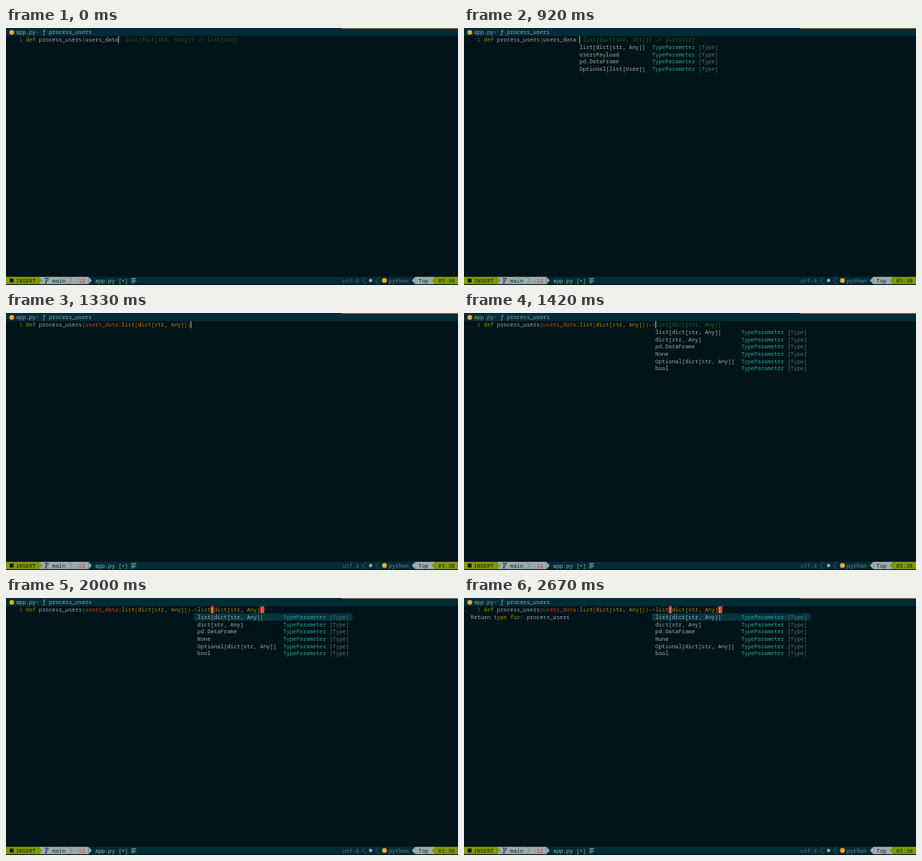
An HTML page with a canvas that plays this animation: 600x342 px, repeating every 2750 ms.

```html
<!DOCTYPE html>
<html lang="en">
<head>
<meta charset="utf-8">
<title>Editor completion</title>
<style>
html, body { margin: 0; width: 100%; height: 100%; overflow: hidden; background: #001419; }
canvas { display: block; width: 600px; height: 342px; }
</style>
</head>
<body>
<canvas id="stage"></canvas>
<script>
const W = 600, H = 342, LOOP = 2750;
const CELL = 4.38, ROW = 9.71, TOP = 1;
const STATUS_ROW = 34;
const C = {
  bg: '#001419', bar: '#002c38', select: '#063540', dim: '#576d74', text: '#9eabac',
  green: '#849900', yellow: '#b28500', orange: '#c94c16', red: '#db302d',
  cyan: '#29a298', ghost: '#2a651c', name: '#8fc3a0', python: '#eaa82c'
};

const canvas = document.getElementById('stage');
const ctx = canvas.getContext('2d');
const ratio = window.devicePixelRatio || 1;
canvas.width = W * ratio;
canvas.height = H * ratio;

const colX = col => col * CELL;
const rowY = row => TOP + row * ROW;

function fillCells(col, row, count, color) {
  ctx.fillStyle = color;
  ctx.fillRect(colX(col), rowY(row), count * CELL, ROW);
}

// Every glyph sits on the terminal grid; returns the column after the text.
function put(col, row, text, color) {
  ctx.fillStyle = color;
  for (const ch of text) {
    if (ch !== ' ') ctx.fillText(ch, colX(col), rowY(row) + 7.4);
    col++;
  }
  return col;
}

function putAll(col, row, parts) {
  for (const [text, color] of parts) col = put(col, row, text, color);
  return col;
}

function path(points, close) {
  ctx.beginPath();
  points.forEach(([x, y]) => ctx.lineTo(x, y));
  if (close) ctx.closePath();
}

function dot(col, row, radius, color) {
  ctx.fillStyle = color;
  ctx.beginPath();
  ctx.arc(colX(col), rowY(row) + ROW / 2, radius, 0, Math.PI * 2);
  ctx.fill();
}

// dir is 1 for a tip on the right, -1 for a tip on the left.
function arrow(col, row, dir, color, filled) {
  const y = rowY(row);
  const base = colX(dir > 0 ? col : col + 1);
  path([[base, y], [base + dir * CELL, y + ROW / 2], [base, y + ROW]], filled);
  if (filled) {
    ctx.fillStyle = color;
    ctx.fill();
  } else {
    ctx.strokeStyle = color;
    ctx.lineWidth = 0.7;
    ctx.stroke();
  }
}

function drawHeader() {
  ctx.fillStyle = C.bar;
  ctx.fillRect(0, 0, W, TOP + ROW);
  ctx.fillStyle = '#b5752a';
  ctx.fillRect(446, 0, W - 446, 1);
  dot(1.75, 0, 3.2, C.python);
  put(3, 0, 'app.py', C.text);
  put(9, 0, '›', C.green);
  put(11, 0, 'ƒ', C.text);
  put(13, 0, 'process_users', C.text);
}

function drawBranch(x, y) {
  ctx.strokeStyle = C.bar;
  ctx.lineWidth = 0.8;
  path([[x, y + 1.5], [x, y + 8.5]]);
  ctx.stroke();
  path([[x, y + 6], [x + 2.6, y + 4.6], [x + 2.6, y + 2]]);
  ctx.stroke();
  ctx.fillStyle = C.bar;
  for (const [dx, dy] of [[0, 1.8], [0, 8], [2.6, 2]]) {
    ctx.beginPath();
    ctx.arc(x + dx, y + dy, 0.9, 0, Math.PI * 2);
    ctx.fill();
  }
}

function drawStatus() {
  const r = STATUS_ROW, y = rowY(r);
  fillCells(0, r, 137, C.bar);

  fillCells(10, r, 15, C.text);
  fillCells(0, r, 10, C.green);
  arrow(10, r, 1, C.green, true);
  ctx.fillStyle = C.bg;
  ctx.fillRect(5, y + 2.4, 5, 5);
  put(3, r, 'INSERT', C.bg);
  drawBranch(53, y);
  put(14, r, 'main', C.bar);
  arrow(19, r, 1, C.dim, false);
  put(21, r, '-12', C.red);
  arrow(25, r, 1, C.text, true);

  put(27, r, 'app.py', C.name);
  put(34, r, '[+]', C.name);
  ctx.fillStyle = C.name;
  [6.5, 5, 6.5, 4].forEach((w, i) => ctx.fillRect(166.4, y + 1.7 + i * 1.9, w, 0.9));

  put(102, r, 'utf-8', C.dim);
  arrow(108, r, -1, C.dim, false);
  dot(110.5, r, 2.2, C.text);
  arrow(112, r, -1, C.dim, false);
  dot(114.7, r, 3.2, C.python);
  put(116, r, 'python', '#6f858c');
  arrow(123, r, -1, C.text, true);
  fillCells(124, r, 6, C.text);
  put(125, r, 'Top', C.bar);
  arrow(129, r, -1, C.green, true);
  fillCells(130, r, 7, C.green);
  put(131, r, '05:30', C.bar);
}

function drawCursor(col) {
  ctx.fillStyle = '#c6d0d0';
  ctx.fillRect(colX(col), rowY(1), 0.8, ROW);
}

function putType(col, matched) {
  const end = putAll(col, 1, [
    ['list', C.yellow], ['[', C.orange], ['dict', C.yellow], ['[', C.green],
    ['str', C.yellow], [', ', C.text], ['Any', C.yellow], [']', C.green], [']', C.orange]
  ]);
  if (matched) {
    for (const [at, ch] of [[col + 4, '['], [end - 1, ']']]) {
      fillCells(at, 1, 1, C.red);
      put(at, 1, ch, '#f2d5d0');
    }
  }
  return end;
}

function drawMenu(col, items, typeCol, selected) {
  if (selected) fillCells(col - 1, 2, typeCol + 21 - col + 1, C.select);
  items.forEach((item, i) => {
    put(col, 2 + i, item, C.text);
    put(typeCol, 2 + i, 'TypeParameter', C.cyan);
    put(typeCol + 14, 2 + i, '[Type]', C.dim);
  });
}

const ARG_TYPES = ['list[dict[str, Any]]', 'UsersPayload', 'pd.DataFrame', 'Optional[list[User]]'];
const RETURN_TYPES = ['list[dict[str, Any]]', 'dict[str, Any]', 'pd.DataFrame', 'None',
  'Optional[dict[str, Any]]', 'bool'];

function drawEditor(t) {
  const argPicked = t >= 1080;
  put(0, 1, '.', C.dim);
  put(4, 1, '1', C.orange);
  let col = putAll(6, 1, [
    ['def ', C.green], ['process_users', C.text], ['(', C.orange],
    ['users_data', argPicked ? C.orange : C.text]
  ]);

  if (t < 80) {
    put(col, 1, ': list[dict[str, str]]) -> list[str]:', C.ghost);
    drawCursor(col);
    return;
  }
  col = put(col, 1, ':', C.text);

  if (!argPicked) {
    if (t >= 170) put(col, 1, ' list[dict[str, str]]) -> list[str]:', C.ghost);
    if (t >= 420) drawMenu(35, ARG_TYPES, 57, false);
    drawCursor(col);
    return;
  }

  col = putType(col, t < 1250);
  if (t < 1250) {
    put(col, 1, '):', C.ghost);
    drawMenu(35, ARG_TYPES, 57, true);
    drawCursor(col);
    return;
  }

  col = put(col, 1, ')', C.orange);
  if (t >= 1340) col = put(col, 1, '->', C.green);
  if (t >= 1920) {
    col = putType(col, true);
    put(col, 1, ':', C.ghost);
  } else if (t >= 1420) {
    put(col, 1, 'list[dict[str, Any]]:', C.ghost);
  }
  if (t >= 1420) drawMenu(58, RETURN_TYPES, 84, t >= 1920);
  if (t >= 2420) {
    putAll(2, 2, [['Return ', C.text], ['type ', C.yellow], ['for', C.green], [': process_users', C.text]]);
  }
  drawCursor(col);
}

function render(now) {
  ctx.setTransform(ratio, 0, 0, ratio, 0, 0);
  ctx.font = '7.3px "Noto Sans Mono", "DejaVu Sans Mono", monospace';
  ctx.textBaseline = 'alphabetic';
  ctx.fillStyle = C.bg;
  ctx.fillRect(0, 0, W, H);
  drawHeader();
  drawEditor((now - start) % LOOP);
  drawStatus();
}

const start = performance.now();
function tick() {
  render(performance.now());
  requestAnimationFrame(tick);
}
tick();
</script>
</body>
</html>
```
